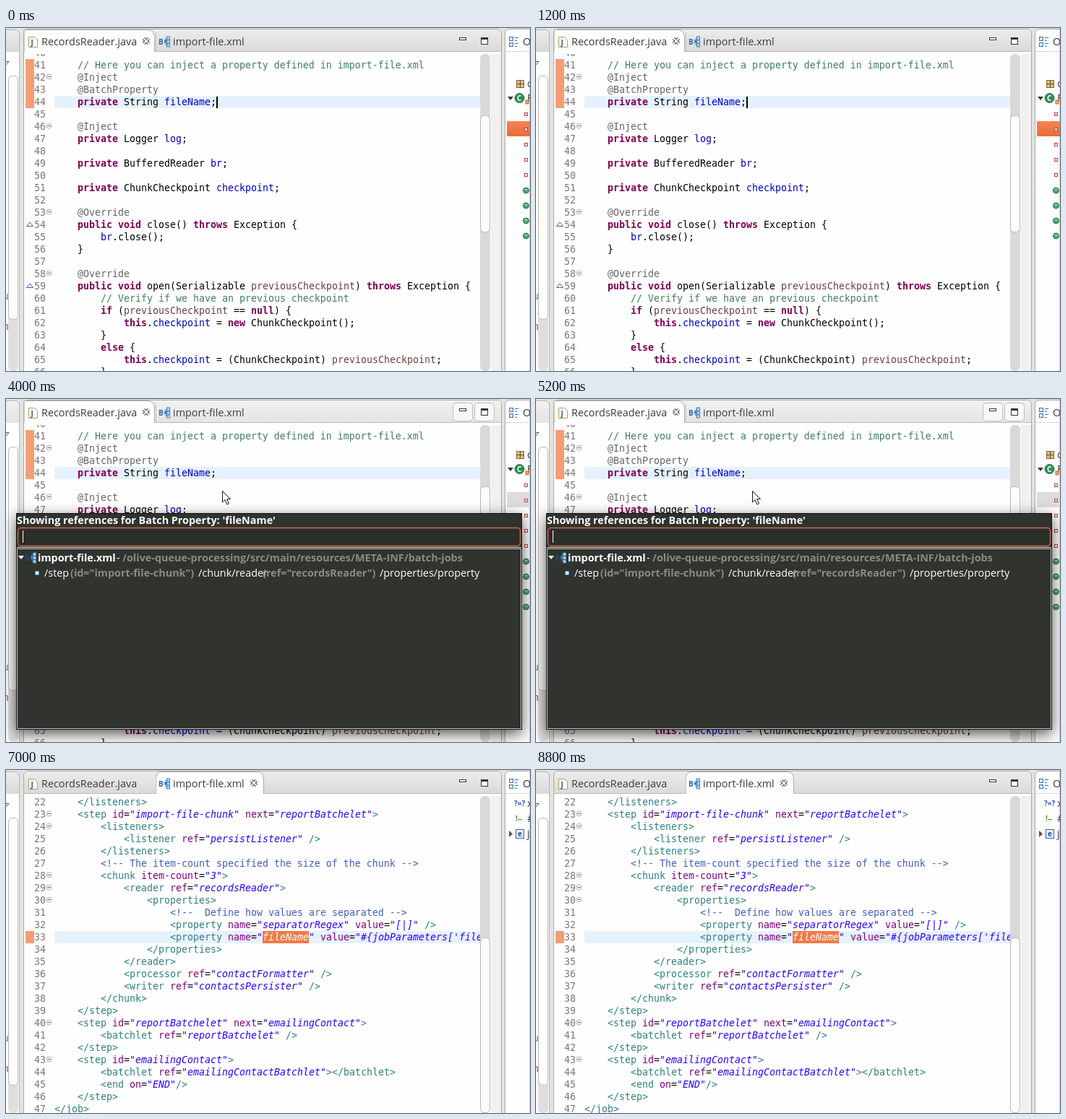
Write an HTML page that moves like this. It is 725x475 px and loops after 10000 ms.

```html
<!DOCTYPE html>
<html lang="en">
<head>
<meta charset="utf-8">
<title>Property references</title>
<style>
  html, body { margin: 0; width: 100%; height: 100%; overflow: hidden; background: #dfdfdd; }
  svg { display: block; width: 725px; height: 475px; }
  text { white-space: pre; fill: #3c3c3c; font: 14.4px "Open Sans", "Noto Sans", sans-serif; }
  .b { font-weight: 700; }
  .w { fill: #fff; }
  .g { fill: #8a8a86; font-weight: 700; }
  .code text { font: 13.29px "DejaVu Sans Mono", monospace; fill: #000; }
  .code .num { fill: #787878; }
  .code .key { fill: #7f0055; font-weight: 700; }
  .code .note { fill: #3f7f5f; }
  .code .anno { fill: #646464; }
  .code .field { fill: #0000c0; }
  .code .param { fill: #6a3e3e; }
  .code .xnote { fill: #3f5fbf; }
  .code .tag { fill: #2f8080; }
  .code .str { fill: #2a00ff; font-style: italic; }
  .code .attr { fill: #7f007f; }
  .code .sel { fill: #fff; font-style: italic; }
  .tiny { font-size: 10px; font-weight: 700; }
</style>
</head>
<body>
<svg id="stage" viewBox="0 0 725 475"></svg>
<script>
const JAVA = {
  first: 41, top: 56, folds: [42, 46, 53, 58],
  rule: /(?<note>\/\/.*)|(?<anno>@\w+)|\b(?<key>private|public|void|throws|if|else|this|new|null)\b|\b(?<field>fileName|log|br|checkpoint)\b|\b(?<param>previousCheckpoint)\b/g,
  text: `    // Here you can inject a property defined in import-file.xml
    @Inject
    @BatchProperty
    private String fileName;

    @Inject
    private Logger log;

    private BufferedReader br;

    private ChunkCheckpoint checkpoint;

    @Override
    public void close() throws Exception {
        br.close();
    }

    @Override
    public void open(Serializable previousCheckpoint) throws Exception {
        // Verify if we have an previous checkpoint
        if (previousCheckpoint == null) {
            this.checkpoint = new ChunkCheckpoint();
        }
        else {
            this.checkpoint = (ChunkCheckpoint) previousCheckpoint;
        }`
};
const XML = {
  first: 22, top: 49, folds: [23, 24, 28, 29, 30, 40, 43],
  rule: /(?<xnote><!--.*-->)|(?<tag><\/?\w+|\/?>)|(?<str>"[^"]*")|(?<attr>[\w-]+)(?==)/g,
  text: `    </listeners>
    <step id="import-file-chunk" next="reportBatchelet">
        <listeners>
            <listener ref="persistListener" />
        </listeners>
        <!-- The item-count specified the size of the chunk -->
        <chunk item-count="3">
            <reader ref="recordsReader">
                <properties>
                    <!--  Define how values are separated -->
                    <property name="separatorRegex" value="[|]" />
                    <property name="fileName" value="#{jobParameters['fileName']}" />
                </properties>
            </reader>
            <processor ref="contactFormatter" />
            <writer ref="contactsPersister" />
        </chunk>
    </step>
    <step id="reportBatchelet" next="emailingContact">
        <batchlet ref="reportBatchelet" />
    </step>
    <step id="emailingContact">
        <batchlet ref="emailingContactBatchlet"></batchlet>
        <end on="END"/>
    </step>
</job>`
};

const esc = s => String(s).replace(/&/g, '&amp;').replace(/</g, '&lt;');
const text = (x, y, s, cls = '', more = '') => `<text x="${x}" y="${y}" class="${cls}" ${more}>${esc(s)}</text>`;
const rect = (x, y, w, h, fill, more = '') => `<rect x="${x}" y="${y}" width="${w}" height="${h}" fill="${fill}" ${more}/>`;
const path = (d, fill, more = '') => `<path d="${d}" fill="${fill}" ${more}/>`;
const circle = (x, y, r, fill, more = '') => `<circle cx="${x}" cy="${y}" r="${r}" fill="${fill}" ${more}/>`;
const stroke = (c, w = 1) => `stroke="${c}" stroke-width="${w}"`;
const fade = (id, a, b) => `<linearGradient id="${id}" x2="0" y2="1"><stop stop-color="${a}"/><stop offset="1" stop-color="${b}"/></linearGradient>`;

const defs = `<defs>${fade('bar', '#ececeb', '#d9d9d8')}${fade('barOff', '#f1f1f0', '#e4e4e2')}${fade('hot', '#f68456', '#ea6c38')}
  <pattern id="hatch" width="2" height="2" patternUnits="userSpaceOnUse">
  ${rect(0, 0, 2, 2, '#f9c6a8')}${rect(0, 0, 1, 1, '#ee7440')}${rect(1, 1, 1, 1, '#ee7440')}</pattern>
  <clipPath id="view">${rect(25, 36, 631, 439, '#000')}</clipPath></defs>`;

function codeLine(line, y, rule) {
  let out = '', at = 0;
  const put = (s, col, cls) => {
    const body = s.trimStart();
    if (body) out += text(67 + 8 * (col + s.length - body.length), y, body, cls);
  };
  for (const m of line.matchAll(rule)) {
    put(line.slice(at, m.index), at);
    put(m[0], m.index, Object.keys(m.groups).find(k => m.groups[k]));
    at = m.index + m[0].length;
  }
  put(line.slice(at), at);
  return out;
}

function code({ first, top, folds, rule, text: body }) {
  const base = n => top + 17 * (n - first);
  let out = '';
  body.split('\n').forEach((line, i) => {
    out += text(39, base(first + i), first + i, 'num') + codeLine(line, base(first + i), rule);
  });
  for (const n of folds) {
    const y = base(n) - 5.5;
    out += circle(59.5, y, 3.5, '#f4f8fc', stroke('#a3b5c8')) + path(`M57.5 ${y}h4`, 'none', stroke('#536c88'));
  }
  return out;
}

const treeIcon = (x, y, b = '#2f66b5') => text(x, y + 4, 'B', 'tiny', `style="fill:${b}"`) +
  path(`M${x + 10} ${y - 4}v9M${x + 10} ${y - 4}h4m-4 4.5h4m-4 4.5h4`, 'none', stroke('#4b87bd')) +
  [-7, -2, 3].map(d => rect(x + 11.5, y + d + .5, 4, 4, '#b9e0f7', stroke('#3c81bb'))).join('') +
  rect(x + 8, y - 2, 3, 4, '#3c81bb');

const closeIcon = x => {
  const d = `M${x - 3.5} 14.5l7 7m0-7l-7 7`;
  return path(d, 'none', stroke('#444', 4.4)) + path(d, 'none', stroke('#fff', 2));
};

const thumb = (x, y, w, h) => rect(x + .5, y + .5, w - 1, h - 1, '#fcfcfb', `rx="5" ${stroke('#bbb8b4')}`);

function frameParts(xml, inactive) {
  const tab = xml ? 'M207.5 33V10Q208 2.5 216 2.5H348Q356 2.5 356.5 12V33' : 'M25 33V2.5H196Q205 2.5 205.5 12V33';
  const bar = inactive ? 'url(#barOff)' : 'url(#bar)';
  let out = rect(0, 0, 725, 475, '#e3e3e1');
  // left view
  out += rect(0, 2, 18, 31, bar) + rect(0, 33, 18, 442, '#fefefe') +
    path('M0 2.5H13Q18.5 2.5 18.5 9V475', 'none', stroke('#b4b4b2')) +
    path('M0 46.5H4L0 51', '#fff', stroke('#555')) +
    rect(3, 66, 14, 409, '#dededc', 'rx="6"') + thumb(3, 66, 14, xml ? 371 : 338) +
    text(-5, 79, '-') + text(-5, 376, 'u', '', 'style="fill:#3f8f7f"') + text(-5, 418, 'n', '', 'style="fill:#8b3a3a"');
  // editor
  out += path('M24.5 475V8Q24.5 1.5 31 1.5H679Q685.5 1.5 685.5 8V475', bar, stroke('#aaa9a7')) +
    rect(25, 2, 660, 31, bar, 'rx="5"') +
    rect(25, 33, 660, 442, '#fefefe') + path('M25 32.5H685', 'none', stroke('#bdbcba')) +
    path(tab, '#fdfdfd', stroke('#aaa9a7')) + path('M207.5 6V32', 'none', stroke('#c5c5c3'));
  out += path('M31.5 12.5h8l4 4v10h-12z', '#fffdf3', stroke('#b89a55')) + text(34.5, 23.5, 'J', 'tiny', 'style="fill:#2b5ca8"') +
    text(49, 24, 'RecordsReader.java') + treeIcon(211, 18.5) + text(231, 24, 'import-file.xml') + closeIcon(xml ? 343 : 194);
  if (inactive) out += [618.5, 648.5].map(x => rect(x, 5.5, 27, 25, '#f8f8f7', `rx="4" ${stroke('#bfbebb')}`)).join('');
  out += rect(627.5, 13.5, 9, 3, '#fff', stroke('#333')) + rect(657.5, 13.5, 9, 9, '#fff', stroke('#333')) + rect(657, 13, 10, 3, '#333');
  out += rect(671, 36, 14, 439, '#f0f0ef') + rect(656, 36, 14, 439, '#d9d9d7', 'rx="6"') +
    (xml ? thumb(656, 232, 14, 243) : thumb(656, 121, 14, 162));
  // outline view
  out += path('M690.5 475V8Q690.5 1.5 697 1.5H725V475', '#fefefe', stroke('#aaa9a7')) +
    path('M691 32.5H725', 'none', stroke('#d6d6d4')) +
    rect(696.5, 12.5, 5, 5, '#d8e9fb', stroke('#3b6fb0')) + rect(696.5, 20.5, 5, 5, '#d8e9fb', stroke('#3b6fb0')) +
    path('M704 13.5h5m-5 4h3m-3 4h5m-5 4h3', 'none', stroke('#3b6fb0')) + text(715, 24, 'O');
  return out + (xml ? xmlOutline() : javaOutline(inactive));
}

function javaOutline(inactive) {
  return rect(706.5, 72.5, 10, 10, '#d8bf82', stroke('#86652e')) + path('M711.5 72v11M706 77.5h11', 'none', stroke('#6e4f22')) +
    text(721, 82, 'c') + path('M694 95h8l-4 5z', '#333') + circle(710.5, 97, 6.5, '#2f8f55', stroke('#1f7040')) +
    text(707, 100.8, 'C', 'tiny w') + text(721, 102, 'F') +
    rect(693, 129, 32, 21, inactive ? '#dcdcda' : 'url(#hot)') +
    [0, 1, 2, 3, 4].map(i => rect(717.5, 117.5 + 21 * i, 4, 4, '#fff', stroke('#c9303c'))).join('') +
    rect(719, 100, 4, 5, '#f3a56c', stroke('#c66a30')) +
    [0, 1, 2, 3].map(i => circle(719.5, 225 + 21 * i, 4, '#4fa672', stroke('#20773f')) + rect(717.5, 223 + 21 * i, 4, 1.5, '#a8d9b9')).join('');
}

const xmlOutline = () => text(703, 50, '?=?', 'tiny', 'style="fill:#2b5ca8"') + text(721, 51, 'x') +
  text(705, 71, '!--', 'tiny', 'style="fill:#4f8a1d"') + text(721, 72, '#') +
  path('M696 84l5 4.5-5 4.5z', '#555') + rect(705.5, 82.5, 11, 12, '#e9f3fd', stroke('#2f66a8')) +
  text(708, 92, 'e', 'tiny', 'style="fill:#174f96"') + text(721, 93, 'j');

function editor(xml, caret) {
  const y = xml ? 223 : 94;
  let out = rect(67, y, 589, 17, '#e6f1fe') + (xml ? rect(27, 223, 12, 17, 'url(#hatch)') : rect(27, 43, 12, 68, 'url(#hatch)'));
  if (!xml) out += text(39, 39, 40, 'num') +
    [272, 357].map(v => path(`M28.5 ${v + 2.5}L33 ${v - 3}L37.5 ${v + 2.5}Z`, '#fff', stroke('#5550b4'))).join('');
  out += code(xml ? XML : JAVA);
  if (xml) out += rect(355, 223, 64, 17, '#f07a46') + text(355, 236, 'fileName', 'sel');
  if (caret) out += rect(291, 95, 2, 16, '#000');
  return `<g class="code" clip-path="url(#view)">${out}</g>`;
}

const menu = () => rect(219.5, 116.5, 273, 73, '#fff', `${stroke('#111')} style="filter:drop-shadow(0 7px 11px #0005)"`) +
  rect(224, 121, 264, 21, 'url(#hot)') + text(243, 137, 'Show All Batch Property References', 'w') +
  text(243, 158, 'Open Declaration') + text(243, 179, 'Open Declared Type');

function popup(picked) {
  const dim = picked ? 'b w' : 'g';
  return rect(14.5, 158.5, 699, 299, '#30332e', `${stroke('#111')} style="filter:drop-shadow(0 6px 10px #000a)"`) +
    text(15, 173, "Showing references for Batch Property: 'fileName'", 'b w') +
    rect(16.5, 178.5, 695, 25, '#2c2e2a', `rx="4" ${stroke('#c9694a', 1.4)}`) + rect(23, 182, 1, 17, '#fff') +
    rect(15.5, 207.5, 697, 249, 'none', stroke('#c4c5bf')) + path('M15 205.5H713', 'none', stroke('#d8d8d3')) +
    path('M17 217h8l-4 5z', '#fff') + treeIcon(26, 219.5, '#27476e') + text(44, 225, 'import-file.xml', 'b w') + text(153, 225, '-', 'w') +
    text(161, 225, '/olive-queue-processing/src/main/resources/META-INF/batch-jobs', 'g') +
    (picked ? rect(16, 230, 697, 21, 'url(#hot)') : '') +
    rect(40.5, 238.5, 5, 5, '#d5efff', `rx="1" ${stroke('#4b97cf')}`) +
    text(53, 246, '/step', 'w') + text(89, 246, '(id="import-file-chunk")', dim) +
    text(266, 246, '/chunk/reader', 'w') + text(355, 246, '(ref="recordsReader")', dim) +
    text(517, 246, '/properties/property', 'w');
}

const pointer = (x, y) => path(`M${x + .5} ${y + .5}v15.5l3.6-3.4 2.8 6.4 2.6-1.2-2.8-6.2h4.8z`, '#fff', stroke('#111'));

const scene = (xml, inactive, over = '') => defs + frameParts(xml, inactive) + editor(xml, !xml && !inactive) + over;
const scenes = [
  [0, scene(false, false)],
  [2000, scene(false, false, menu() + pointer(407, 138))],
  [4000, scene(false, true, popup(false) + pointer(299, 127))],
  [6000, scene(false, true, popup(true) + pointer(317, 248))],
  [7000, scene(true, false)]
];

const stage = document.getElementById('stage');
const start = performance.now();
let shown;
function tick() {
  const t = (performance.now() - start) % 10000;
  const now = scenes.filter(([from]) => t >= from).pop();
  if (now !== shown) {
    shown = now;
    stage.innerHTML = now[1];
  }
  requestAnimationFrame(tick);
}
tick();
</script>
</body>
</html>
```
